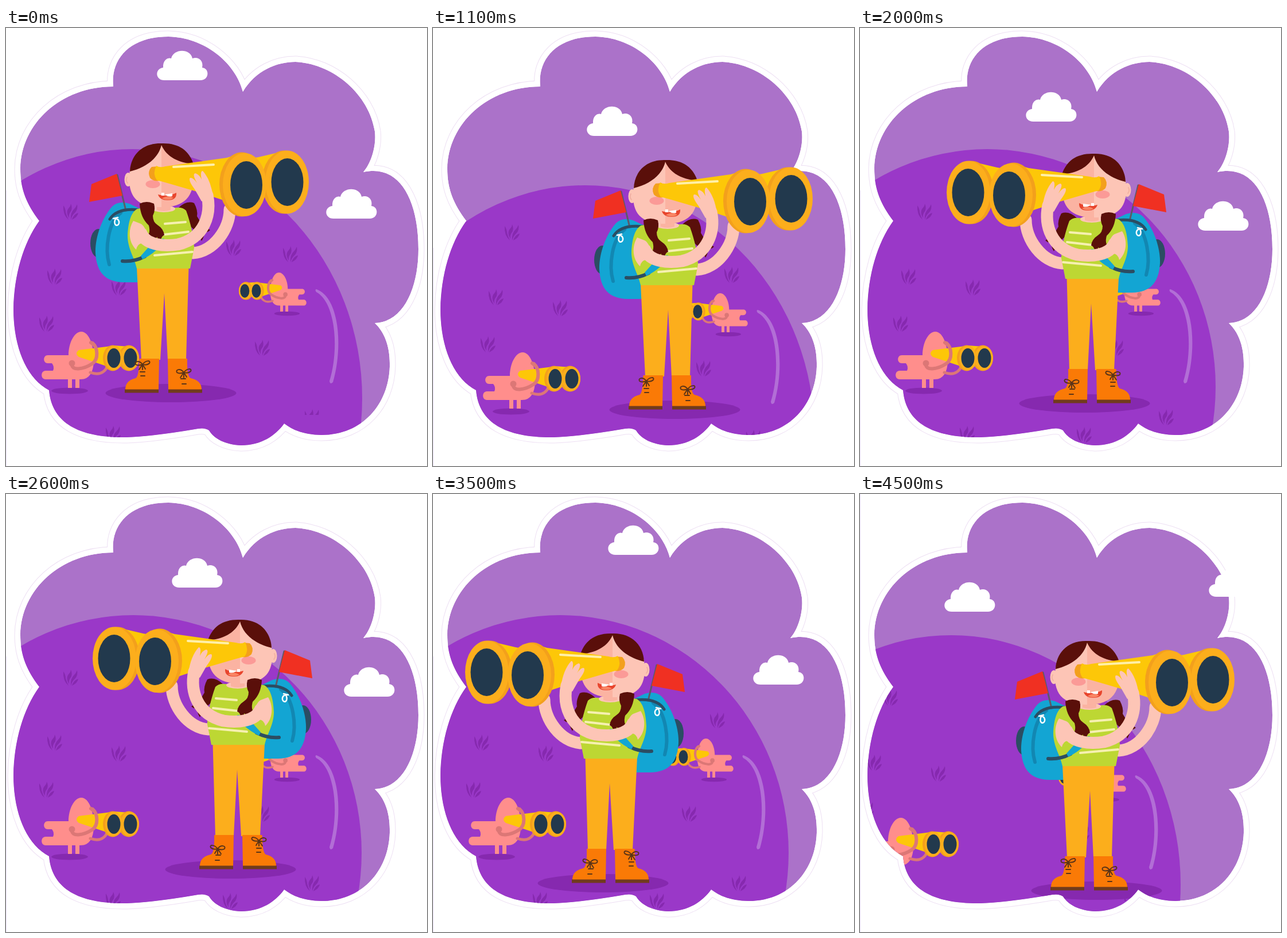
Animation of 734 by 763 pixels, one loop 5 s. Source, as an HTML page:

```html
<!DOCTYPE html>
<html lang="en">
<head>
<meta charset="utf-8">
<title>Lookout</title>
<style>
  html, body { margin: 0; height: 100%; overflow: hidden; background: #fff; }
  svg { display: block; width: 100%; height: 100%; }
  .line { fill: none; stroke-linecap: round; stroke-linejoin: round; }
  .skin { fill: #fdc5b6; }
  .arm { fill: none; stroke: #fdc5b6; stroke-width: 21; stroke-linecap: round; }
  .blush { fill: #fbb3a2; }
  .hair { fill: #5a0f0a; }
  .yellow { fill: #fdc708; }
  .rim { fill: #f3a01c; }
  .ring { fill: #fcae1c; }
  .lens { fill: #22394d; }
  .orange { fill: #fa7a06; }
  .sole { fill: #713b1c; }
  .shade { fill: #8629af; }
  .pink { fill: #ff8e8c; }
</style>
</head>
<body>
<svg viewBox="0 0 734 763">
  <defs>
    <path id="blob" d="M187 102C182 54 216 15 283 15C345 16 400 60 413 111C435 74 472 59 505 59C570 62 633 115 643 180C646 205 637 235 623 251C638 248 648 249 656 251C694 260 719 310 719 385C719 450 695 512 643 514C660 530 670 555 669 590C667 655 622 709 550 709C523 709 502 702 485 689C470 710 445 727 410 727C382 726 362 715 354 701Q347 696 335 698Q260 711 210 713C130 714 80 690 75 631C35 610 13 555 13 490C14 430 30 375 58 336C32 302 25 275 25 245C26 167 95 102 187 102Z"/>
    <clipPath id="inside"><use href="#blob"/></clipPath>
    <clipPath id="topHalf"><path d="M-20-20H20V-3H-20Z"/></clipPath>
    <path id="cloud" fill="#fff" d="M13 51C-3 51-4 31 11 29C10 14 21 11 25 13C29-4 58-5 62 13C72 9 82 17 79 29C92 30 92 51 76 51Z"/>
    <path id="tuft" class="shade" d="M-3 15Q-13 7-12-10Q-8-4-8 2Q-6 9-3 15ZM-2 12Q-9 1-2-6Q1-9 1-13Q5-4 0 2Q-3 6-2 12ZM1 15Q0 2 7-4Q10-7 12-12Q14-3 8 3Q3 7 1 15ZM3 15Q6 5 14 3Q13 10 3 15Z"/>
    <g id="bird">
      <ellipse class="shade" cx="111" cy="632" rx="32" ry="5.5"/>
      <path class="pink" d="M108 606h7v21h-7zM121 606h7v21h-7zM73 570H109C109 549 119 529 131 529C146 529 153 556 153 577C153 599 146 612 130 612H69C60 612 60 597 69 597H82Q85 590 80 584H73C64 584 64 570 73 570Z"/>
      <path class="line" stroke="#dc7776" stroke-width="5" d="M147 600C161 605 171 601 176 591"/>
      <path class="yellow" d="M127 561L176 555L188 553L215 555V580L188 597L172 588L127 573Q119 567 127 561Z"/>
      <ellipse class="rim" cx="214" cy="575" rx="18" ry="22.5"/>
      <ellipse class="ring" cx="216" cy="575" rx="16" ry="21.5"/>
      <ellipse class="lens" cx="217" cy="575" rx="11.5" ry="17"/>
      <ellipse class="rim" cx="186" cy="575" rx="17" ry="22.5"/>
      <ellipse class="ring" cx="188" cy="575" rx="15" ry="21.5"/>
      <ellipse class="lens" cx="188" cy="575" rx="11.5" ry="17"/>
      <path class="line" stroke="#dc7776" stroke-width="6" d="M115 584C113 599 136 594 150 585C162 577 160 557 151 549M153 552l-5-4"/>
      <circle cx="115" cy="584" r="5.5" fill="#dc7776"/>
    </g>
    <path id="bow" class="line" stroke="#5b3418" stroke-width="2" d="M0 0C-6-8-15-5-12 0Q-8 3 0 0C6-8 15-7 12-2Q8 2 0 0L-6 9M0 0L5 8M0 0V9"/>
  </defs>

  <rect id="edge" width="1" fill="#efe6fb"/>
  <use href="#blob" fill="none" stroke="#eddff3" stroke-width="21"/>
  <use href="#blob" fill="#ab72c9" stroke="#fff" stroke-width="19"/>

  <g clip-path="url(#inside)">
    <use href="#blob" fill="#ab72c9"/>
    <ellipse id="hill" fill="#9a38c8"/>
    <g id="field">
      <g id="tufts"></g>
      <path fill="#b26ed6" d="M541 455C583 470 587 560 570 617Q565 622 564 615C581 560 575 478 541 460Q538 456 541 455Z"/>
      <use href="#bird"/>
      <use href="#bird" transform="translate(476 426) scale(-.694 .694) translate(-131 -529)"/>
    </g>
    <ellipse id="shadow" class="shade" cx="287.5" cy="636" rx="114" ry="16"/>
  </g>

  <use id="cloudA" href="#cloud"/>
  <use id="cloudB" href="#cloud"/>

  <g id="girl">
    <!-- backpack and flag -->
    <ellipse cx="161" cy="375" rx="14" ry="25" fill="#2b4d63"/>
    <path fill="#13a5d3" d="M185 311C164 335 155 370 156 392C158 425 172 442 205 443H232L240 380V318L215 306Q196 300 185 311Z"/>
    <path class="line" stroke="#1287b2" stroke-width="6" d="M200 322C178 338 172 385 180 412"/>
    <path class="line" stroke="#5d5a68" stroke-width="3" d="M194 256L209 318"/>
    <path fill="#f03022" d="M193 254L149 272L145 303L203 292Z"/>
    <path class="line" stroke="#2b4d63" stroke-width="5" d="M181 333C190 319 206 314 232 317"/>
    <path class="line" stroke="#fff" stroke-width="2.5" d="M187 332L195 330M191 332C186 344 195 347 197 340Q198 334 192 332"/>

    <path class="arm" d="M390 316C390 350 362 390 326 392"/>
    <path class="hair" d="M301 313Q315 300 328 305Q335 318 333 328Q342 345 356 352Q351 357 346 355Q346 363 341 371Q338 366 339 360Q330 354 322 346Q308 332 301 313Z"/>

    <!-- legs and boots -->
    <path fill="#fcae1c" d="M228 417H318.5L314 578H282L276 462L269 578H236Z"/>
    <path class="orange" d="M232.5 576H267L266 630H208Q208 614 226 610Q232 607 232.5 576ZM282 576H316Q315 607 322 610Q341 614 341 630H283Z"/>
    <path class="sole" d="M207 629.5h59v6h-59zM283 629.5h59v6h-59z"/>
    <use href="#bow" x="238" y="586"/>
    <use href="#bow" x="310" y="600"/>
    <path class="line" stroke="#5b3418" stroke-width="2" d="M234 599h8M235 606h7M305 611h8M307 620h7"/>

    <!-- shirt -->
    <path fill="#bdd733" d="M229 315Q244 312 258 313H297Q308 312 314 318C322 340 328 365 328 383L321 419H228C224 400 212 384 212 362C213 336 219 320 229 315Z"/>
    <ellipse class="skin" cx="275" cy="315" rx="20" ry="6"/>
    <path class="blush" d="M263 304h24v13q-12 4-24 0z"/>
    <path class="line" stroke="#f6f0b0" stroke-width="4" d="M277 341L313 338M274 360L318 355M259 396L325 390"/>
    <path class="line" stroke="#2b4d63" stroke-width="6" d="M203 406Q222 408 242 398"/>
    <path fill="#13a5d3" d="M235 397L260 369L276 367Q268 388 238 403Z"/>

    <!-- head: the far half lies in shade -->
    <ellipse class="skin" cx="213" cy="264" rx="6.5" ry="12"/>
    <path class="line" stroke="#f3b3a3" stroke-width="2" d="M211 260q-3 6 1 10"/>
    <path class="skin" d="M216 248C210 293 228 312 271 312V202C243 203 224 220 216 248Z"/>
    <path class="blush" d="M271 202V312C316 312 331 290 327 240C318 216 298 203 271 202Z"/>
    <path class="hair" d="M271 201C235 200 217 224 216 250C245 243 266 226 271 204C280 225 302 235 327 237C319 213 301 200 271 201Z"/>
    <ellipse cx="256" cy="272" rx="12.5" ry="7" fill="#fb9a97"/>
    <path fill="#e8452d" d="M265 290Q282 295 297 287Q298 300 282 300Q268 300 265 290Z"/>
    <path fill="#f98564" d="M272 297Q282 290 292 296Q284 302 272 297Z"/>
    <path fill="#fff" d="M271 287h5v5h-5zM277 290L290 288V293Q283 295 277 290Z"/>
    <path class="hair" d="M233 306Q245 300 258 306Q261 318 256 327Q256 338 264 343Q275 350 276 361Q272 361 269 371Q264 372 264 364Q256 372 244 366Q253 358 249 344Q234 330 233 306Z"/>

    <!-- binoculars -->
    <path class="yellow" d="M400 232L440 225L487 214V285L440 290Z"/>
    <ellipse class="rim" cx="485" cy="268.5" rx="39" ry="55"/>
    <ellipse class="ring" cx="490" cy="268.5" rx="38" ry="55"/>
    <ellipse class="lens" cx="490.5" cy="268.5" rx="28" ry="41.5"/>
    <path class="rim" d="M254 242Q246 250 251 261Q257 268 268 266L265 241Z"/>
    <path class="yellow" d="M262 240Q268 244 278 241L385 226L412 218V327L376 299L336 286L281 270L263 265Q255 254 262 240Z"/>
    <path class="line" stroke="#fff0a8" stroke-width="4" d="M292 242L362 238"/>
    <ellipse class="rim" cx="411" cy="272.5" rx="39" ry="56"/>
    <ellipse class="ring" cx="416" cy="273" rx="38" ry="55"/>
    <ellipse class="lens" cx="419" cy="273.5" rx="28" ry="41.5"/>

    <!-- near arm -->
    <path class="skin" d="M222 336C212 352 214 374 227 386Q229 376 237 375L255 382L258 365C245 362 244 346 235 341Z"/>
    <path class="arm" d="M236 358C244 378 276 381 300 377C346 366 358 325 351 291"/>
    <path class="skin" d="M341 302L329 281Q317 265 321 261Q326 260 333 270Q324 254 330 253Q337 255 341 264Q338 249 343 249Q357 264 361 294Z"/>
  </g>
</svg>
<script>
const $ = id => document.getElementById(id);
const DURATION = 5000;

// Hill as [cx, cy, rx, ry] for each viewing direction.
const HILL = { right: [221, 645, 400, 434], left: [222, 625, 398, 414] };

const lookEnd = { at: 1500, face: 'right', girl: [125, 55], hill: [-62, 35], field: [-60, 35], a: [147, 154], b: [608, 128], edge: 0 };
const poses = [
  { at: 0, face: 'right', girl: [0, 0], hill: [0, 0], field: [0, 0], a: [263, 40], b: [558, 281], edge: 283 },
  { at: 500, face: 'right', girl: [134, 29], hill: [44, 63], field: [25, 36], a: [268, 137], b: null, edge: 383 },
  lookEnd,
  { at: 2000, face: 'left', girl: [679, 18], hill: [0, 0], field: [0, 0], a: [289, 112], b: [589, 302], edge: 283 },
  { at: 3000, face: 'left', girl: [584, 42], hill: [21, 26], field: [0, 0], a: [241, 69], b: [558, 281], edge: 323 },
  { at: 3500, face: 'left', girl: [584, 42], hill: [0, 0], field: [0, 0], a: [305, 55], b: [558, 281], edge: 283 },
  { ...lookEnd, at: 4500 }
];

const tuftSpots = [[112, 319], [84, 432], [70, 514], [196, 451], [396, 382], [495, 393], [446, 556], [186, 706], [533, 677], [390, 708]];
$('tufts').innerHTML = tuftSpots
  .map(([x, y]) => `<g transform="translate(${x} ${y})"><use href="#tuft"/></g>`).join('');
const [cutTuft, lowTuft] = [...$('tufts').children].slice(-2);

const move = (id, [x, y], extra = '') =>
  $(id).setAttribute('transform', `translate(${x} ${y})${extra}`);

function show(pose) {
  const right = pose.face === 'right';
  const flip = right ? '' : ' scale(-1 1)';
  move('girl', pose.girl, flip);
  move('shadow', pose.girl, flip);
  move('field', pose.field);
  move('hill', pose.hill);
  ['cx', 'cy', 'rx', 'ry'].forEach((name, i) => $('hill').setAttribute(name, HILL[pose.face][i]));
  move('cloudA', pose.a);
  move('cloudB', pose.b || [-200, 0]);
  $('edge').setAttribute('y', pose.edge);
  $('edge').setAttribute('height', 763 - pose.edge);
  // The lowest tufts are partly hidden while she looks right.
  cutTuft.setAttribute('clip-path', right ? 'url(#topHalf)' : 'none');
  lowTuft.setAttribute('visibility', right ? 'hidden' : 'visible');
}

let current;
function tick() {
  const time = performance.now() % DURATION;
  const pose = poses.findLast(p => p.at <= time);
  if (pose !== current) show(current = pose);
  requestAnimationFrame(tick);
}
tick();
</script>
</body>
</html>
```
